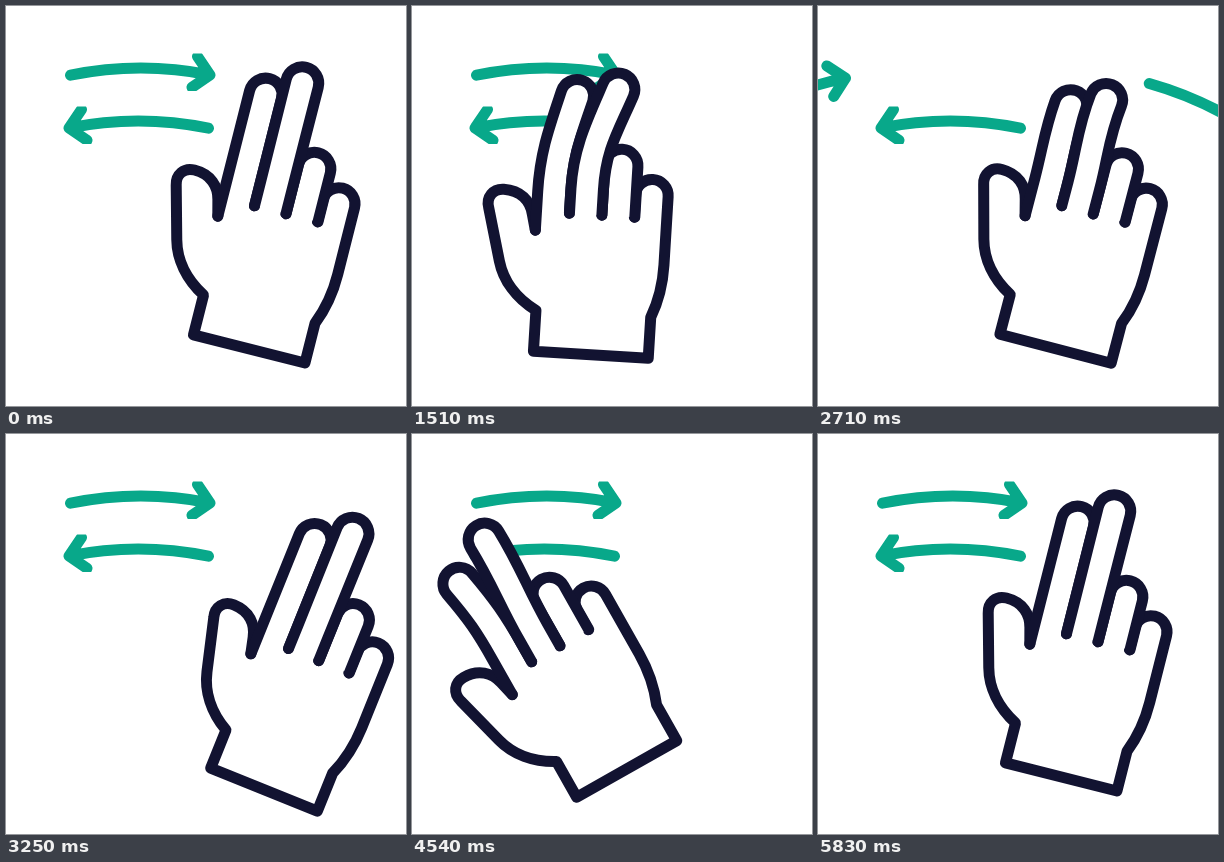
These frames come from a looping animation (400 px wide and 400 px high, 5860 ms). An HTML page:

```html
<!DOCTYPE html>
<html lang="en">
<head>
<meta charset="utf-8">
<title>Two-finger swipe</title>
<style>
  html, body { margin: 0; width: 100%; height: 100%; overflow: hidden; background: #fff; }
  svg { display: block; width: 100%; height: 100%; }
  path { stroke-width: 11; stroke-linecap: round; stroke-linejoin: round; }
  .arrow { fill: none; stroke: #08a88a; }
  #hand path { fill: #fff; stroke: #121331; }
</style>
</head>
<body>
<svg viewBox="0 0 400 400">
  <defs>
    <clipPath id="trim"><rect x="50" y="47.5" width="170" height="37.5"/></clipPath>
    <path id="arrow" d="M64.5 69.2A354 354 0 0 1 204 69M191.5 50.5L204 69L186 81.3"/>
  </defs>
  <g id="top" class="arrow">
    <g><use href="#arrow"/></g>
    <g><use href="#arrow"/></g>
  </g>
  <g id="bottom" class="arrow" transform="translate(267 53) scale(-1 1)">
    <g><use href="#arrow"/></g>
    <g><use href="#arrow"/></g>
  </g>
  <g id="hand">
    <path d="M35 -140V-162.5A16.25 16.25 0 0 1 67.5 -162.5V-94C67.5 -75 64 -57 57.5 -41V0H-57.5V-41C-78 -52 -92 -69 -97 -88L-111 -141C-114 -151 -108 -160 -97 -160C-80 -160 -70 -150 -67 -137L-63 -121"/>
    <path id="index"/>
    <path d="M2.5 -140V-190.5A16.5 16.5 0 0 1 35.5 -190.5V-140"/>
    <path id="middle"/>
  </g>
</svg>
<script>
const LOOP = 5860, REST = 1030, STEP = 30, R = 16.5;
const $ = id => document.getElementById(id);

// time, palm x, palm y, tilt
const palmKeys = [
  [1000, 268, 245, 14.2],
  [1510, 185, 248, 3.5],
  [1630, 166, 251, 0],
  [1960, 111, 271, -12.6],
  [2080, 113.5, 269, -11.1],
  [2200, 133, 257, -8],
  [2450, 205, 244, 4],
  [2710, 263, 245, 14.6],
  [3230, 296, 262, 22],
  [3400, 284, 259, 20.5],
  [3670, 186.5, 241, 0],
  [4000, 125, 258, -17],
  [4180, 118, 263, -25],
  [4350, 127, 258, -29],
  [4540, 165, 247, -29.5],
  [4630, 184, 245, -27],
  [4900, 246, 238, -4],
  [5200, 284, 244, 19.5],
  [5300, 287, 245, 21.5],
  [5800, 268, 245, 14.2]
];

// time, then fingertip shift x, shift y, bend
const indexKeys = [
  [1000, 0, 0, 0],
  [1510, 17, -7, 15],
  [2080, -5, 16, -11],
  [2710, 0, 12, 5],
  [3230, 0, 0, 0],
  [3670, 2, 13, 8],
  [4540, -8, 7, -11],
  [5300, 0, 0, 0]
];
const middleKeys = [
  [1000, 0, 0, 0],
  [1510, 25, 4, 20],
  [2080, -7, 17, -11],
  [2710, 0, 17, 7],
  [3230, 0, 0, 0],
  [3670, 3, 20, 10],
  [4540, 3, 1, -2],
  [5300, 0, 0, 0]
];

// Monotone cubic interpolation of one column
function track(keys, col, t) {
  const last = keys.length - 1;
  if (t <= keys[0][0]) return keys[0][col];
  if (t >= keys[last][0]) return keys[last][col];
  const slope = i => (keys[i + 1][col] - keys[i][col]) / (keys[i + 1][0] - keys[i][0]);
  const tangent = i => {
    if (i === 0 || i === last) return 0;
    const a = slope(i - 1), b = slope(i);
    return a * b <= 0 ? 0 : 2 * a * b / (a + b);
  };
  let i = 0;
  while (t >= keys[i + 1][0]) i++;
  const h = keys[i + 1][0] - keys[i][0], u = (t - keys[i][0]) / h, v = 1 - u;
  return keys[i][col] * (1 + 2 * u) * v * v + tangent(i) * h * u * v * v
    + keys[i + 1][col] * u * u * (3 - 2 * u) - tangent(i + 1) * h * u * u * v;
}
const sample = (keys, t) => [1, 2, 3].map(col => track(keys, col, t));

// A finger rooted at two points, with a round tip that can shift and bend
function finger(left, right, joint, tipY, [dx, dy, bend]) {
  const a = bend * Math.PI / 180, c = Math.cos(a), s = Math.sin(a);
  const cx = (left[0] + right[0]) / 2 + dx, cy = tipY + dy;
  const k = (joint - cy) * 0.4;
  const lx = cx - R * c, ly = cy - R * s, rx = cx + R * c, ry = cy + R * s;
  return `M${left}L${left[0]} ${joint}`
    + `C${left[0]} ${joint - k} ${lx - k * s} ${ly + k * c} ${lx} ${ly}`
    + `A${R} ${R} 0 0 1 ${rx} ${ry}`
    + `C${rx - k * s} ${ry + k * c} ${right[0]} ${joint - k} ${right[0]} ${joint}L${right}`;
}

// One copy leaves along the arc while the other arrives
function slide(id, t, start, leave, arrive) {
  const u = Math.min(1, Math.max(0, (t - start) / 1080));
  const p = (1 - Math.cos(Math.PI * u)) / 2;
  const put = (el, [turn, x, y], f) => {
    el.setAttribute("transform", `translate(${x * f} ${y * f}) rotate(${turn * f} 135 416)`);
    if (f === 0) el.setAttribute("clip-path", "url(#trim)");
    else el.removeAttribute("clip-path");
  };
  const [out, back] = $(id).children;
  put(out, leave, p);
  put(back, arrive, 1 - p);
}

function draw(t) {
  slide("top", t, 2140, [50, 185, 4], [-50, -80, 6]);
  slide("bottom", t, 3250, [44, 82, 0], [-39, -206, 22]);
  const [x, y, tilt] = sample(palmKeys, t);
  $("hand").setAttribute("transform", `translate(${x} ${y}) rotate(${tilt}) translate(0 101)`);
  $("index").setAttribute("d",
    finger([-63, -121], [-30, -140], -160, -250.5, sample(indexKeys, t)));
  $("middle").setAttribute("d",
    finger([-30, -140], [2.5, -140], -165, -270.5, sample(middleKeys, t)));
}

const begin = performance.now();
function tick() {
  const t = (performance.now() - begin) % LOOP;
  draw(t < REST ? 0 : REST + Math.floor((t - REST) / STEP) * STEP);
  requestAnimationFrame(tick);
}
tick();
</script>
</body>
</html>
```
